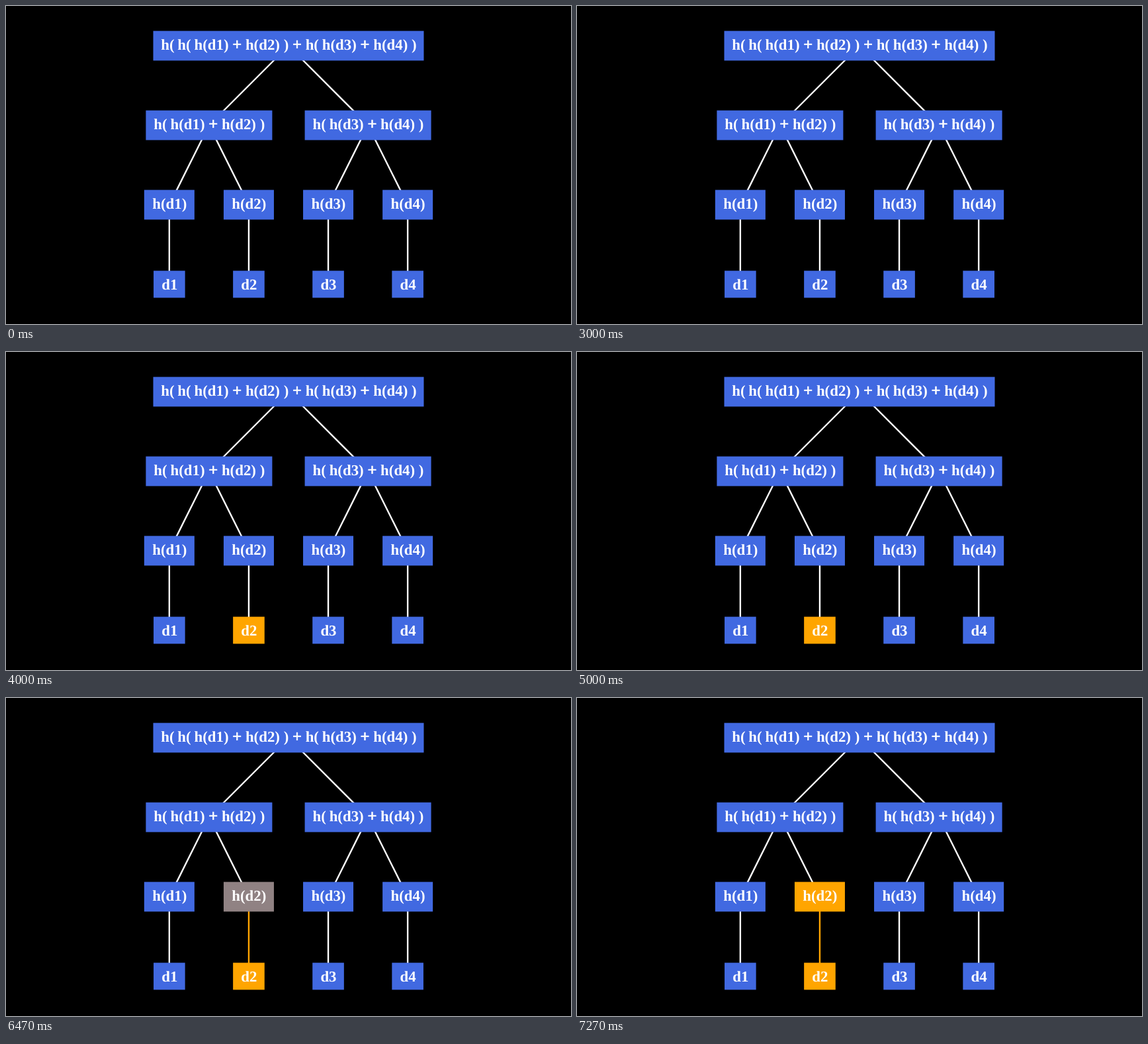
Animation, 854 px wide and 480 px high, one loop 8 s. Source, as an HTML page:

```html
<!DOCTYPE html>
<html lang="en">
<head>
<meta charset="utf-8">
<title>Hash tree</title>
<style>
  html, body { margin: 0; width: 100%; height: 100%; overflow: hidden; background: #000; }
  svg { display: block; width: 100vw; height: 100vh; }
  line { stroke: #fff; stroke-width: 2.4; }
  rect { fill: rgb(65, 105, 225); }
  text {
    fill: #fff;
    font: bold 22.85px "Liberation Serif", "Times New Roman", serif;
    text-anchor: middle;
    text-rendering: geometricPrecision;
  }
  .plus { font-size: 24.5px; stroke: #fff; stroke-width: 0.6; }
</style>
</head>
<body>
<svg id="stage" viewBox="0 0 854 480"></svg>
<script>
const LOOP = 8000, FPS = 15;
const CENTER = 427, UNIT = 60.05;
const BLUE = [65, 105, 225], WHITE = [255, 255, 255], ORANGE = [255, 165, 0];
const stage = document.getElementById('stage');

function add(tag, attrs, text, parent = stage) {
  const el = document.createElementNS('http://www.w3.org/2000/svg', tag);
  for (const key in attrs) el.setAttribute(key, attrs[key]);
  if (text) el.textContent = text;
  parent.appendChild(el);
  return el;
}

function addLine(x1, y1, x2, y2) {
  return add('line', { x1, y1, x2, y2 });
}

// Plus signs are a little heavier; the gap after an opening bracket is tighter.
function addLabel(label, x, y) {
  const text = add('text', { x, y });
  let tight = false;
  for (const part of label.split(/(\+|\( )/)) {
    if (!part) continue;
    const attrs = part === '+' ? { class: 'plus' } : tight ? { dx: -0.94 } : {};
    add('tspan', attrs, part, text);
    tight = part === '( ';
  }
}

function addBox(label, x, y, w, h, baseline) {
  const box = add('rect', { x: x - w / 2, y: y - h / 2, width: w, height: h });
  addLabel(label, x + 0.4, y + baseline);
  return box;
}

const place = k => CENTER + k * UNIT;
const columns = [-3, -1, 1, 3].map(place);
const pairs = [-2, 2].map(place);

// Edges run centre to centre and are covered by the boxes.
pairs.forEach(x => addLine(CENTER, 60, x, 180));
columns.forEach((x, i) => addLine(pairs[i >> 1], 180, x, 300));
const stems = columns.map(x => addLine(x, 300, x, 420));

const pairText = ['h( h(d1) + h(d2) )', 'h( h(d3) + h(d4) )'];
addBox('h( ' + pairText.join(' + '), CENTER, 60, 409, 44.8, 6.2);
pairs.forEach((x, i) => addBox(pairText[i], x, 180, 191, 44.8, 6.2));
const hashes = columns.map((x, i) => addBox(`h(d${i + 1})`, x, 300, 76, 44.8, 6.2));
const leaves = columns.map((x, i) => addBox('d' + (i + 1), x, 420, 47.6, 40.8, 7.8));

const steps = [
  { el: leaves[1], prop: 'fill', from: BLUE, start: 3000 },
  { el: stems[1], prop: 'stroke', from: WHITE, start: 5000 },
  { el: hashes[1], prop: 'fill', from: BLUE, start: 6000 }
];

const sigmoid = x => 1 / (1 + Math.exp(-x));
const edge = sigmoid(-5);

function smooth(t) {
  if (t <= 0) return 0;
  if (t >= 1) return 1;
  return (sigmoid(10 * (t - 0.5)) - edge) / (1 - 2 * edge);
}

function mix(a, b, k) {
  return `rgb(${a.map((v, i) => Math.round(v + (b[i] - v) * k))})`;
}

const origin = performance.now();

function draw(now) {
  const time = Math.max(0, now - origin) % LOOP;
  const tick = Math.floor(time * FPS / 1000 + 0.001) * 1000 / FPS;
  for (const s of steps) {
    s.el.style[s.prop] = mix(s.from, ORANGE, smooth((tick - s.start) / 1000));
  }
  requestAnimationFrame(draw);
}
draw(origin);
</script>
</body>
</html>
```
